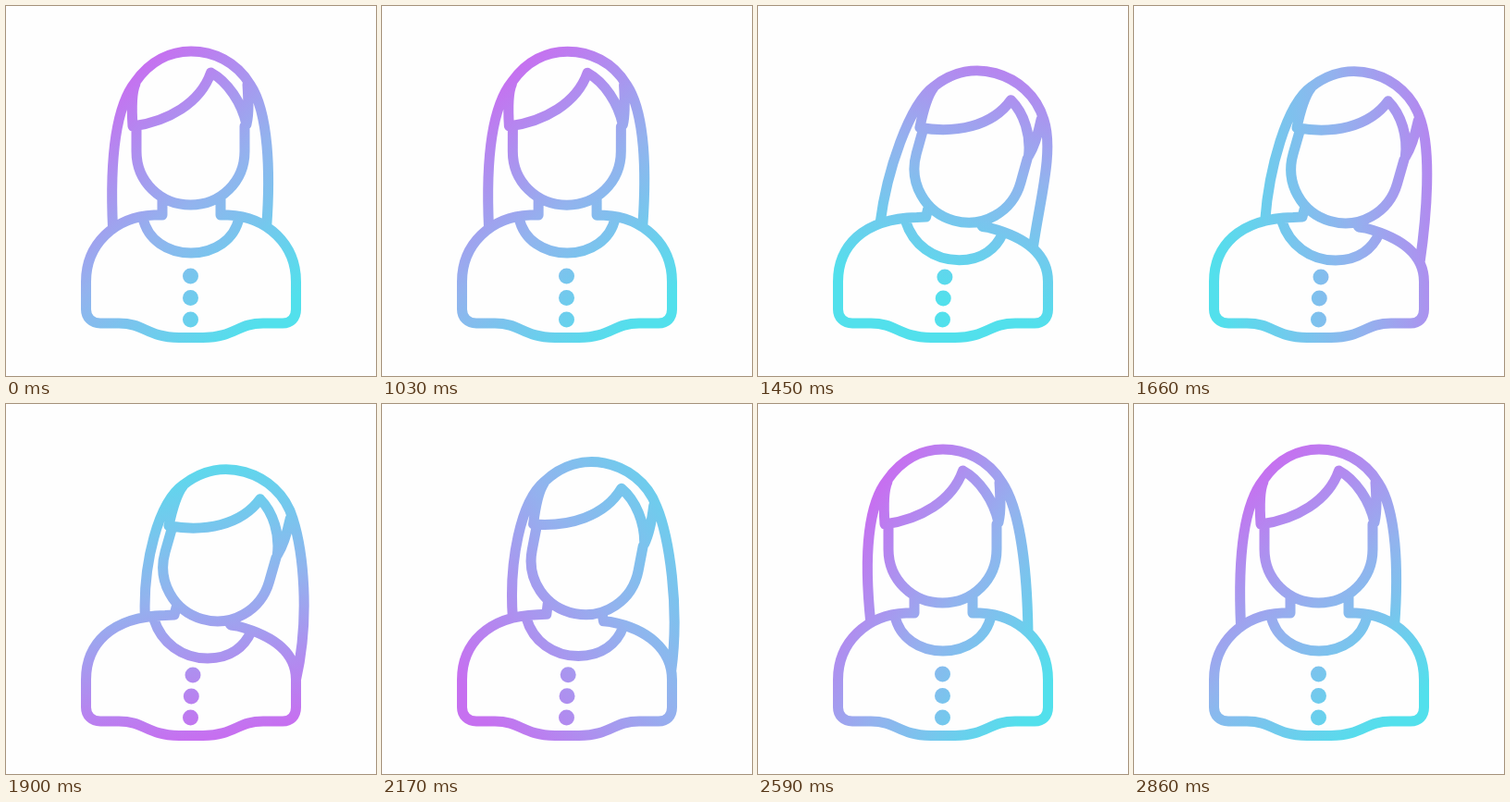
An HTML page for the animation above (2890 ms loop, 400 by 400 pixels).

```html
<!DOCTYPE html>
<html lang="en">
<head>
<meta charset="utf-8">
<title>Tilting avatar</title>
<style>
  html, body { margin: 0; width: 100%; height: 100%; overflow: hidden; background: #fefefe; }
  svg { display: block; width: 100%; height: 100%; }
</style>
</head>
<body>
<svg viewBox="0 0 400 400">
  <defs>
    <linearGradient id="tint" gradientUnits="userSpaceOnUse">
      <stop offset="0" stop-color="#c670f0"/>
      <stop offset="0.5" stop-color="#92b3ee"/>
      <stop offset="1" stop-color="#52e0ec"/>
    </linearGradient>
  </defs>
  <path id="lines" fill="none" stroke="url(#tint)" stroke-width="11" stroke-linecap="round" stroke-linejoin="round"/>
  <g id="buttons" fill="url(#tint)">
    <circle r="8.5"/><circle r="8.5"/><circle r="8.5"/>
  </g>
</svg>
<script>
const LOOP = 2890, START = 1030, STEP = 30;
const MAX_TILT = 16, PIVOT = [147, 269];

// Both head poses are drawn upright; the tilt is applied afterwards.
const HEAD_UPRIGHT =
  'M 140 82 C 156 59 178 49 200 49 C 224 49 249 60 264 85 ' +
  'M 141 130 L 141 157 C 141 190 167 215 199.5 215 C 232 215 258 190 258 157 L 258 130 ' +
  'M 140 84 C 135 95 136 115 137 130 C 175 125 210 105 221.5 72 C 240 82 255 105 260 128 ' +
  'C 263 115 262 100 261 85';
const HEAD_TILTED =
  'M 140 82 C 156 60 178 50.5 200 50.5 C 224 50.5 249 61 264 85 ' +
  'M 141 130 L 141 157 C 141 190 167 216 199.5 216 C 232 216 258 190 258 157 L 258 130 ' +
  'M 140 83 C 135 95 136 115 137 129 C 176 125 212 107 224 74 C 242 84 255 105 258.5 127 ' +
  'C 262 115 262 100 261 85';

const BASE = ' L 86.5 328 C 86.5 337 93 343 102 343 L 122 343 C 150 343 152 358 187 358.5 ' +
  'L 213 358.5 C 248 358 250 343 278 343 L 299 343 C 308 343 313.5 337 313.5 328 L 313.5 298 ';
const TORSO_UPRIGHT =
  'M 169 207 L 169 226 L 160 226 C 117 228 86.5 258 86.5 298' + BASE +
  'C 313.5 258 283 228 240 226 L 232 226 L 232 207 ' +
  'M 148 229 C 153 253 175 267 200 267 C 225 267 247 253 252 229';
const TORSO_TILTED =
  'M 184 220 L 182 228 L 172 228.5 C 112 230 86.5 261 86.5 298' + BASE +
  'C 313.5 268 288 250 250 240 L 243 239 L 241 236 ' +
  'M 160 233 C 168 258 190 275 218 275 C 243 275 258 262 265 246';

const TIMES = [1030, 1450, 1900, 2170, 2410, 2860];

// Strands hang from the head and end on a shoulder curve, which begins at torso point `shoulder`.
// Keys: second handle x, y and the position of the tip along that curve.
const STRANDS = [
  { root: [140, 82], handle: [119, 108], shoulder: 2, keys: [
    [112, 165, 0.4], [139, 180, 0.26], [148, 172, 0.13],
    [137, 170, 0.18], [119, 165, 0.265], [112, 165, 0.4]
  ] },
  { root: [264, 85], handle: [284, 115], shoulder: 22, keys: [
    [286, 180, 0.63], [304, 212, 0.48], [329, 230, 0],
    [322, 220, 0.1], [299, 190, 0.37], [286, 180, 0.63]
  ] }
];

// Gradient: direction of the violet end (clockwise from up), distances of both ends from the centre.
const TINT = [
  [-40, 138, -160], [15, 190, -115], [170, 160, -155],
  [238, 150, -215], [282, 105, -155], [320, 138, -160]
];

const lerp = (a, b, k) => a + (b - a) * k;
const smooth = (t, from, to) => {
  const p = Math.min(1, Math.max(0, (t - from) / (to - from)));
  return p * p * (3 - 2 * p);
};

// Smooth curve through keyed rows, at rest on both ends.
function spline(rows, t) {
  const last = TIMES.length - 1;
  t = Math.min(TIMES[last], Math.max(TIMES[0], t));
  let i = 0;
  while (i < last - 1 && t > TIMES[i + 1]) i++;
  const span = TIMES[i + 1] - TIMES[i], p = (t - TIMES[i]) / span;
  const slope = (j, c) => j === 0 || j === last ? 0
    : (rows[j + 1][c] - rows[j - 1][c]) / (TIMES[j + 1] - TIMES[j - 1]);
  return rows[0].map((_, c) =>
    lerp(rows[i][c], rows[i + 1][c], p * p * (3 - 2 * p)) +
    span * p * (1 - p) * ((1 - p) * slope(i, c) - p * slope(i + 1, c)));
}

function bezier([a, b, c, d], u) {
  const v = 1 - u;
  return a.map((_, i) =>
    v * v * v * a[i] + 3 * v * v * u * b[i] + 3 * v * u * u * c[i] + u * u * u * d[i]);
}

function rotator(degrees) {
  const a = degrees * Math.PI / 180, c = Math.cos(a), s = Math.sin(a);
  return (x, y) => {
    const dx = x - PIVOT[0], dy = y - PIVOT[1];
    return [PIVOT[0] + c * dx - s * dy, PIVOT[1] + s * dx + c * dy];
  };
}

const PAIR = /([\d.]+) ([\d.]+)/g;
const mapPoints = (path, move) => path.replace(PAIR, (_, x, y) => move(+x, +y).join(' '));
const pointsOf = path => path.match(PAIR).map(pair => pair.split(' ').map(Number));

function morph(from, to, k) {
  const target = to.match(/[\d.]+/g);
  let i = 0;
  return from.replace(/[\d.]+/g, n => lerp(+n, +target[i++], k));
}

const lines = document.getElementById('lines');
const tint = document.getElementById('tint');
const buttons = [...document.getElementById('buttons').children];
const set = (el, attrs) => { for (const k in attrs) el.setAttribute(k, attrs[k]); };

function draw(t) {
  const tilt = t < START ? 0 : smooth(t, 1000, 1500) - smooth(t, 1970, 2500);
  const turn = rotator(MAX_TILT * tilt);
  const head = mapPoints(morph(HEAD_UPRIGHT, HEAD_TILTED, tilt), turn);
  const torso = morph(TORSO_UPRIGHT, TORSO_TILTED, tilt);
  const points = pointsOf(torso);

  const strands = STRANDS.map(({ root, handle, shoulder, keys }) => {
    const [x, y, u] = spline(keys, t);
    const tip = bezier(points.slice(shoulder, shoulder + 4), Math.max(0, u));
    return `M ${turn(...root).join(' ')} C ${[...turn(...handle), x, y, ...tip].join(' ')}`;
  });
  lines.setAttribute('d', [head, torso, ...strands].join(' '));

  buttons.forEach((b, i) => set(b, {
    cx: 199.5 + tilt * [2.5, 0.8, 0][i],
    cy: 292 + 23.5 * i + tilt * [1, 0.4, 0][i]
  }));

  const [angle, violet, cyan] = spline(TINT, t);
  const a = angle * Math.PI / 180, ux = Math.sin(a), uy = -Math.cos(a);
  set(tint, {
    x1: 200 + ux * violet, y1: 200 + uy * violet,
    x2: 200 + ux * cyan, y2: 200 + uy * cyan
  });
}

function tick() {
  const t = performance.now() % LOOP;
  draw(t < START ? 0 : START + Math.floor((t - START) / STEP) * STEP);
  requestAnimationFrame(tick);
}
tick();
</script>
</body>
</html>
```
